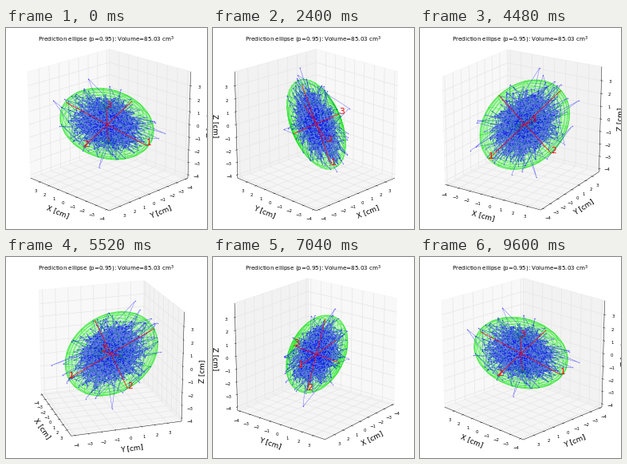
These frames come from a looping animation (252x252 px, 9680 ms). A matplotlib script:

```python
import numpy as np
import matplotlib.pyplot as plt
from matplotlib.animation import FuncAnimation
from matplotlib.collections import LineCollection, PolyCollection

SIZE, DPI = 252, 64
FRAMES, INTERVAL = 121, 80
START, STEP, ELEV = 135, 3, np.radians(20)
DIST = 10
MID, SPAN = -0.1, 8.0            # common data limits of the three axes
EDGE = 0.5 + 1 / 48              # half size of the box, with its margin
TICK_OUT, TICK_IN = 1 / 60, 1 / 120
TICK_PAD, LABEL_PAD = 0.0565, 0.134
TICKS = np.arange(-4, 4)

plt.rcParams["font.family"] = "DejaVu Sans"


def world(p):
    return (np.asarray(p, float) - MID) / SPAN


def project(p, az):
    """Perspective view of box coordinates, last axis x, y, z."""
    p = np.asarray(p, float)
    x, y, z = p[..., 0], p[..., 1], p[..., 2]
    side = -x * np.sin(az) + y * np.cos(az)
    near = x * np.cos(az) + y * np.sin(az)
    depth = DIST - near * np.cos(ELEV) - z * np.sin(ELEV)
    up = z * np.cos(ELEV) - near * np.sin(ELEV)
    return np.stack([side / depth, up / depth], axis=-1)


# Semi-axes of the ellipsoid, one per row
SEMI = np.array([[-1.32, -2.85, -2.07], [1.87, 0.66, -2.1], [1.245, -1.13, 0.746]])


def make_cloud(n=1000):
    rng = np.random.RandomState(4)
    q = rng.randn(n, 3)
    q -= q.mean(axis=0)
    q = q @ np.linalg.inv(np.linalg.cholesky(np.cov(q.T))).T
    r = np.linalg.norm(q, axis=1, keepdims=True)
    q *= np.minimum(1, 3.1 / r)
    p = q @ SEMI / 2.795
    # the points that stick out furthest
    p[80:980:150] = [[1.2, -0.3, -3.85], [3.1, -0.4, 0.55], [3.1, 2.5, 1.72],
                     [0.1, 1.8, 3.9], [-2.1, -4.0, -1.2], [-1.7, 1.7, -0.45]]
    return world(p)


def make_shell(cells=20, sub=5):
    """Curved patches, each outlined by several points per side."""
    n = cells * sub + 1
    u, v = np.meshgrid(np.linspace(0, 2 * np.pi, n), np.linspace(0, np.pi, n),
                       indexing="ij")
    unit = np.stack([np.cos(u) * np.sin(v), np.sin(u) * np.sin(v), np.cos(v)], axis=-1)
    s = world(unit @ SEMI)
    patches = []
    for i in range(0, n - 1, sub):
        for j in range(0, n - 1, sub):
            c = s[i:i + sub + 1, j:j + sub + 1]
            patches.append(np.concatenate([c[0, :-1], c[:-1, -1], c[-1, :0:-1],
                                           c[:0:-1, 0]]))
    return np.array(patches)


CLOUD, SHELL = make_cloud(), make_shell()
RODS = world(np.stack([-SEMI, SEMI], axis=1))

fig = plt.figure(figsize=(SIZE / DPI, SIZE / DPI), dpi=DPI, facecolor="white")
ax = fig.add_axes([0, 0, 1, 1])
ax.set_xlim(-0.095, 0.09)
ax.set_ylim(-0.095, 0.09)
ax.axis("off")

pane_tones = [(g, g, g, 0.5) for g in (0.95, 0.90, 0.925)]
panes = PolyCollection([], facecolors=pane_tones, edgecolors=pane_tones,
                       linewidths=1, zorder=0)
grid = LineCollection([], colors="0.9", linewidths=0.8, zorder=0.5)
spines = LineCollection([], colors="k", linewidths=0.5, zorder=0.7)
marks = LineCollection([], colors="k", linewidths=0.5, zorder=0.8)
shell = PolyCollection([], facecolors=(0, 1, 0, 0.1), edgecolors=(0.1, 0.9, 0.1, 0.4),
                       linewidths=0.6, zorder=1)
rods = LineCollection([], colors=(1, 0, 0, 0.9), linewidths=0.9, zorder=3)
for art in (panes, grid, spines, marks, shell, rods):
    ax.add_collection(art, autolim=False)
cloud, = ax.plot([], [], ".-", color=(0, 0, 1, 0.5), lw=0.6, ms=3.2, mew=0,
                 mfc=(0, 0, 1, 0.5), zorder=2)

tick_texts = [[ax.text(0, 0, str(t).replace("-", "\u2212"), fontsize=6,
                       ha="center", va="top") for t in TICKS] for _ in range(3)]
axis_texts = [ax.text(0, 0, f"{name} [cm]", fontsize=10, ha="center", va="center")
              for name in "XYZ"]
rod_texts = [ax.text(0, 0, str(i + 1), fontsize=12, color="r", zorder=4)
             for i in range(3)]
fig.text(0.5, 1 - 17.2 / SIZE, "Prediction ellipse (p=0.95): Volume=85.03 cm$^3$",
         fontsize=8, ha="center", va="baseline")


def line_angle(a, b):
    dx, dy = b - a
    deg = np.degrees(np.arctan2(dy, dx)) % 180
    return deg - 180 if deg > 90 else deg


def update(i):
    az = np.radians(START + STEP * i)
    fx = -EDGE if np.cos(az) > 0 else EDGE      # far sides
    fy = -EDGE if np.sin(az) > 0 else EDGE
    lo, hi = -EDGE, EDGE

    panes.set_verts(project([
        [(fx, lo, lo), (fx, hi, lo), (fx, hi, hi), (fx, lo, hi)],
        [(lo, fy, lo), (hi, fy, lo), (hi, fy, hi), (lo, fy, hi)],
        [(lo, lo, lo), (hi, lo, lo), (hi, hi, lo), (lo, hi, lo)]], az))

    grid_lines = []
    for t in world(TICKS):
        grid_lines += [[(t, -fy, lo), (t, fy, lo), (t, fy, hi)],
                       [(-fx, t, lo), (fx, t, lo), (fx, t, hi)],
                       [(fx, -fy, t), (fx, fy, t), (-fx, fy, t)]]
    grid.set_segments(project(grid_lines, az))

    # each axis: the edge it runs along and the direction of its tick marks
    anchors = np.array([(0, -fy, lo), (-fx, 0, lo), (-fx, fy, 0)])
    mark_dirs = (1, 0, 0)
    spine_lines, mark_lines = [], []
    for k, anchor in enumerate(anchors):
        along = np.eye(3)[k]
        out = np.sign(anchor)
        ends = project([anchor + lo * along, anchor + hi * along], az)
        spine_lines.append(ends)
        mark = np.eye(3)[mark_dirs[k]] * out
        for t, text in zip(world(TICKS), tick_texts[k]):
            p = anchor + t * along
            mark_lines.append(project([p + TICK_OUT * mark, p - TICK_IN * mark], az))
            text.set_position(project(p + TICK_PAD * out, az))
        axis_texts[k].set_position(project(anchor + LABEL_PAD * out, az))
        axis_texts[k].set_rotation(line_angle(*ends))
    spines.set_segments(spine_lines)
    marks.set_segments(mark_lines)

    shell.set_verts(project(SHELL, az))
    cloud.set_data(*project(CLOUD, az).T)
    rod_ends = project(RODS, az)
    rods.set_segments(rod_ends)
    for text, ends in zip(rod_texts, rod_ends):
        text.set_position(ends[1])
    return []


anim = FuncAnimation(fig, update, frames=FRAMES, interval=INTERVAL, repeat=True)
plt.show()
```
